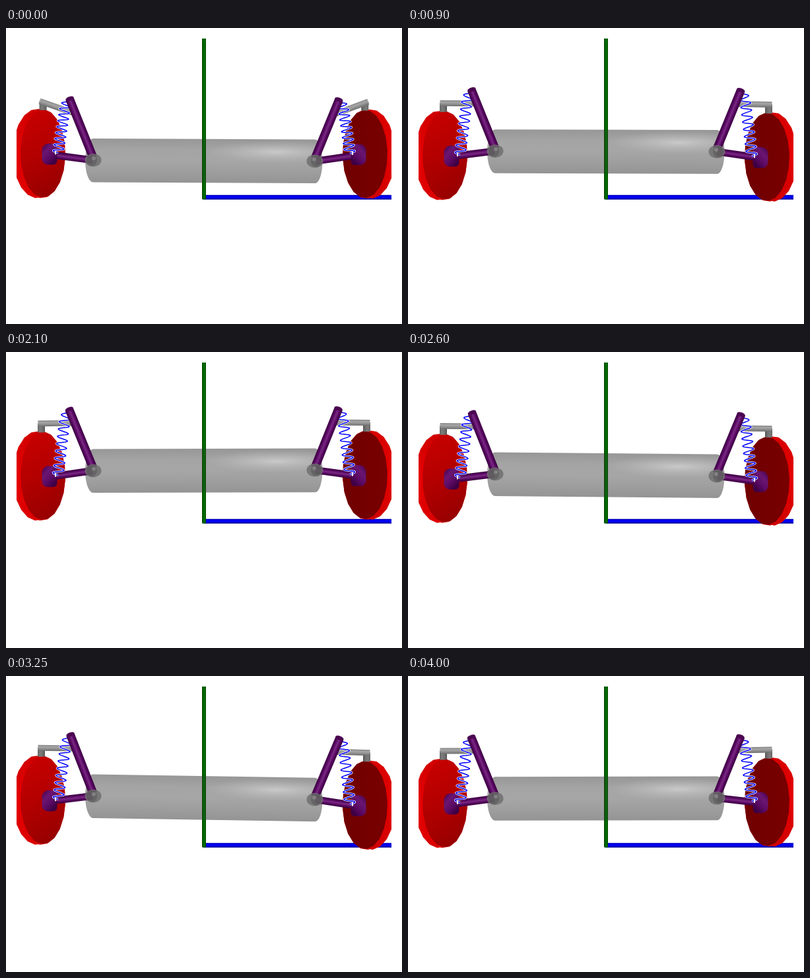
An HTML page with a canvas that plays this animation: 600x450 px, repeating every 4.05 s.

```html
<!DOCTYPE html>
<html>
<head>
<meta charset="utf-8">
<title>Suspension on a bumpy road</title>
<style>
html, body { margin: 0; width: 600px; height: 450px; overflow: hidden; background: #fff; }
canvas { display: block; }
</style>
</head>
<body>
<canvas id="stage" width="600" height="450"></canvas>
<script>
const g = document.getElementById('stage').getContext('2d');
const TAU = Math.PI * 2;
const LOOP = 4050, STEP = 50;
const PURPLE = ['#3b0040', '#560660', '#7a2a82', '#560660', '#3a003e'];
const GREY = ['#858585', '#a6a6a6', '#8e8e8e', '#6e6e6e'];

function gradient(x1, y1, x2, y2, colors) {
  const fill = g.createLinearGradient(x1, y1, x2, y2);
  colors.forEach((c, i) => fill.addColorStop(i / (colors.length - 1), c));
  return fill;
}

// A rod between two points, shaded across its width.
function rod(x1, y1, x2, y2, width, colors) {
  g.save();
  g.translate(x1, y1);
  g.rotate(Math.atan2(y2 - y1, x2 - x1));
  g.fillStyle = gradient(0, -width / 2, 0, width / 2, colors);
  g.fillRect(0, -width / 2, Math.hypot(x2 - x1, y2 - y1), width);
  g.restore();
}

function ellipse(x, y, rx, ry, fill, angle = 0) {
  g.beginPath();
  g.ellipse(x, y, rx, ry, angle, 0, TAU);
  g.fillStyle = fill;
  g.fill();
}

function disc(x, y, rx, ry, fill) {
  const sides = 20;
  g.beginPath();
  for (let i = 0; i < sides; i++) {
    const a = (i + 0.25) * TAU / sides;
    g.lineTo(x + rx * Math.cos(a), y + ry * Math.sin(a));
  }
  g.closePath();
  g.fillStyle = fill;
  g.fill();
}

function strokeLine(color, width) {
  g.strokeStyle = color;
  g.lineWidth = width;
  g.stroke();
}

function spring(x1, y1, x2, y2) {
  const len = Math.hypot(x2 - x1, y2 - y1);
  const ux = (x2 - x1) / len, uy = (y2 - y1) / len;
  g.beginPath();
  for (let i = 0; i <= 200; i++) {
    const u = i / 200;
    const across = 8 * Math.sin(u * TAU * 9) * Math.min(1, 0.5 + 3 * u);
    g.lineTo(x1 + ux * u * len + uy * across, y1 + uy * u * len - ux * across);
  }
  strokeLine('#fff', 3);
  strokeLine('#00f', 1.5);
}

// Where the upright stands; it leans in while the suspension is compressed.
const uprightX = (y, pivotY) => 53.5 + Math.max(0, pivotY - y) * 0.25;

function wheel(y, pivotY, flip) {
  const rim = flip
    ? gradient(0, y - 68, 0, y + 68, ['#d80000', '#e40000', '#d00000'])
    : gradient(0, y - 68, 0, y + 68, ['#d00000', '#e60000', '#dc0000']);
  disc(47, y, 37, 68, rim);
  disc(54, y, 36, 68, rim);
  disc(56, y, 34, 67, flip
    ? gradient(20, 0, 90, 0, ['#780000', '#700000'])
    : gradient(24, y - 50, 84, y + 50, ['#c60000', '#b20000', '#980000']));
  const x = uprightX(y, pivotY);
  rod(x, y - 80, x, y - 66, 11, ['#555', '#707070', '#7c7c7c', '#666']);
}

function linkage(y, pivotY, tilt) {
  const px = 131, topX = px - 35 + tilt * 92, topY = pivotY - 93;
  rod(uprightX(y, pivotY) - 5, y - 79.5, 100 + tilt * 70, pivotY - 72.5, 9, GREY);
  rod(66, y + 1.5, px, pivotY, 11, PURPLE);
  // Hub
  g.fillStyle = gradient(55, y - 12, 77, y + 8, ['#4c0452', '#6a1672', '#5c0a64', '#3e0044']);
  g.beginPath();
  g.roundRect(54.5, y - 15, 23, 32, [10, 6, 6, 9]);
  g.fill();
  spring(topX - 5, topY, 79, y - 1);
  g.strokeStyle = '#fff';
  g.lineWidth = 1;
  g.strokeRect(74.5, y - 3, 1, 4);
  rod(topX, topY, px + 1, pivotY - 4, 13, PURPLE);
  ellipse(topX, topY - 0.5, 6.5, 3, '#4b0552', -0.37);
}

function ball(y) {
  ellipse(132, y, 12.5, 10, 'rgba(112,112,112,.86)');
  ellipse(130, y, 8, 9, 'rgba(80,80,80,.45)');
  ellipse(133, y - 3, 3, 3, 'rgba(165,165,165,.45)');
}

function chassis(left, right) {
  const slope = (right - left) / 336;
  const half = 33.3;
  g.save();
  g.transform(1, slope, 0, 1, 0, left + 0.3 - slope * 132);
  g.beginPath();
  g.ellipse(132, 0, 12, half, 0, TAU / 4, TAU * 0.75);
  g.ellipse(468.5, 0, 11, half, 0, -TAU / 4, TAU / 4);
  g.closePath();
  g.fillStyle = gradient(0, -half, 0, half, ['#979797', '#a4a4a4', '#a6a6a6', '#9e9e9e', '#949494']);
  g.fill();
  // Soft highlight along the far half
  g.clip();
  g.translate(410, -14);
  g.scale(110, 17);
  const shine = g.createRadialGradient(0, 0, 0, 0, 0, 1);
  shine.addColorStop(0, 'rgba(210,210,210,.8)');
  shine.addColorStop(1, 'rgba(190,190,190,0)');
  g.fillStyle = shine;
  g.fillRect(-1, -1, 2, 2);
  g.restore();
}

function pose(t) {
  const wave = (hz, lag = 0) => -Math.sin(TAU * hz * t - lag);
  const l = wave(2.9), r = wave(3);
  const settle = 17.3 * (1 + t / 0.05) * Math.exp(-t / 0.05);
  return {
    wheelL: 190.8 + 4.6 * l,
    wheelR: 191.5 + 4.7 * r,
    left: 183.6 + settle + 4.4 * l + 0.8 * r,
    right: 184.1 + settle + 4.1 * wave(3, 0.25) + 0.8 * l
  };
}

function draw(t) {
  const p = pose(t);
  const tilt = (p.right - p.left) / 336;
  const sides = [[p.wheelL, p.left, false, tilt], [p.wheelR, p.right, true, -tilt]];
  g.clearRect(0, 0, 600, 450);
  g.save();
  g.beginPath();
  g.rect(16, 15, 568, 420);
  g.clip();

  rod(299, 257.3, 584, 257.3, 7, ['#0000a0', '#0000ff', '#0000e0', '#000090']);
  for (const [y, py, flip] of sides) mirrored(flip, () => wheel(y, py, flip));
  chassis(p.left, p.right);
  rod(300, 16, 300, 260.5, 6, ['#004000', '#007400', '#006400', '#003c00']);
  const mid = (p.left + p.right) / 2;
  g.fillStyle = 'rgba(60,60,60,.22)';
  g.fillRect(297, mid - 33, 6, 66);
  for (const [y, py, flip, lean] of sides) {
    mirrored(flip, () => {
      linkage(y, py, lean);
      ball(py);
    });
  }
  g.restore();
}

function mirrored(flip, paint) {
  g.save();
  if (flip) {
    g.translate(600, 0);
    g.scale(-1, 1);
  }
  paint();
  g.restore();
}

function tick() {
  const ms = performance.now() % LOOP;
  draw(Math.floor(ms / STEP) * STEP / 1000);
  requestAnimationFrame(tick);
}
tick();
</script>
</body>
</html>
```
